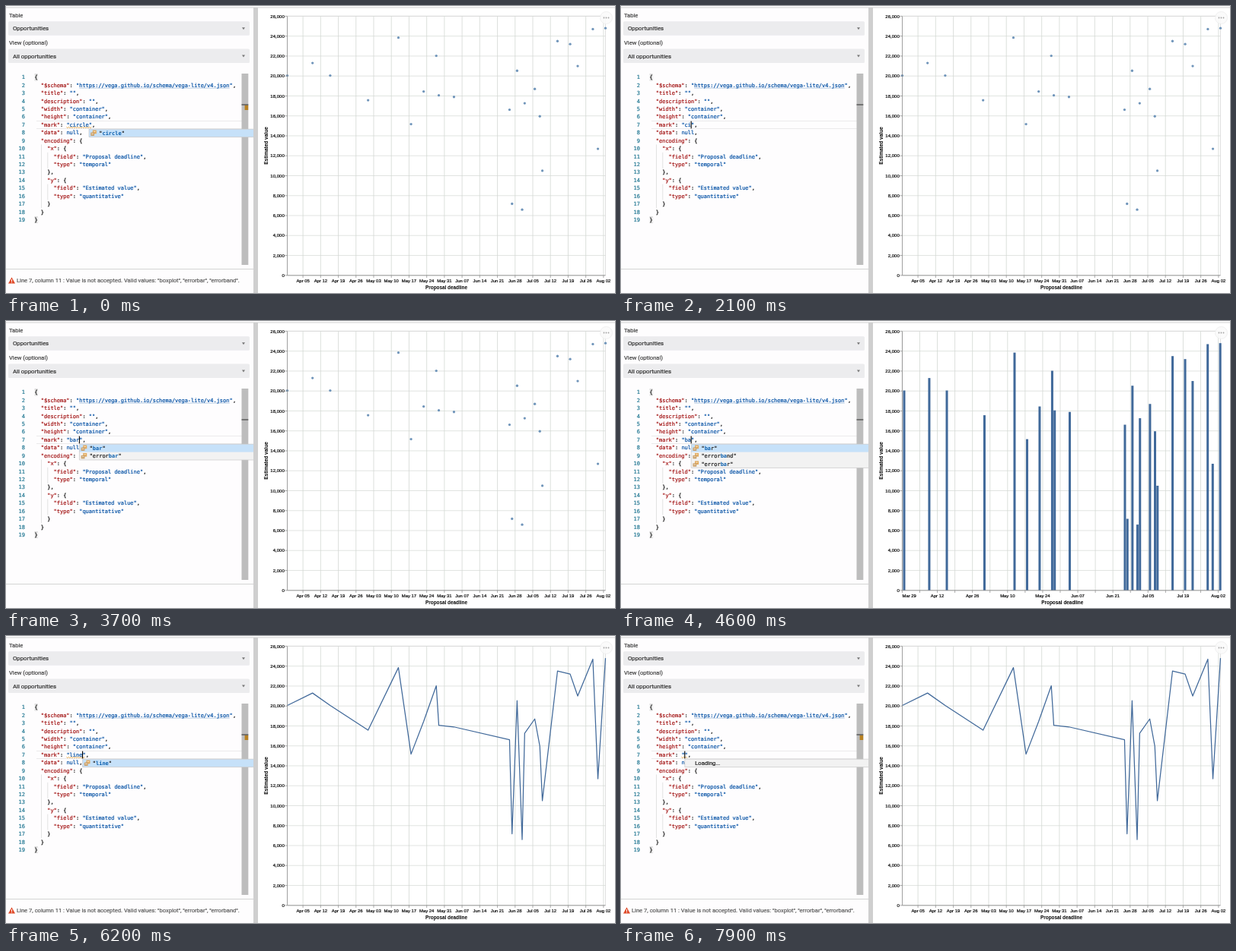
Write an HTML page with a canvas that moves like this. It is 800 px wide and 378 px high and loops after 8000 ms.

```html
<!DOCTYPE html>
<html lang="en">
<head>
<meta charset="utf-8">
<title>Chart editor</title>
<style>
html, body { margin: 0; width: 100%; height: 100%; overflow: hidden; background: #fff; }
canvas { display: block; width: 800px; height: 378px; }
</style>
</head>
<body>
<canvas id="stage"></canvas>
<script>
const W = 800, H = 378, LOOP = 8000;
const canvas = document.getElementById('stage');
const ctx = canvas.getContext('2d');
const ratio = Math.max(1, window.devicePixelRatio || 1);
canvas.width = W * ratio;
canvas.height = H * ratio;

const MONO = '"DejaVu Sans Mono", monospace';
const UI = 'Roboto, sans-serif';
const AXIS = '"Liberation Sans", Arial, sans-serif';

// ---- helpers
function rect(x, y, w, h, color) {
  ctx.fillStyle = color;
  ctx.fillRect(x, y, w, h);
}
function path(points, color, width = 1) {
  ctx.strokeStyle = color;
  ctx.lineWidth = width;
  ctx.beginPath();
  points.forEach(([x, y], i) => i ? ctx.lineTo(x, y) : ctx.moveTo(x, y));
  ctx.stroke();
}
// Regular text gets a hairline outline so that small sizes stay dark.
function text(str, x, y, size, family, color, align = 'left', weight = '') {
  ctx.font = `${weight} ${size}px ${family}`;
  ctx.fillStyle = ctx.strokeStyle = color;
  ctx.textAlign = align;
  ctx.textBaseline = 'alphabetic';
  ctx.fillText(str, x, y + size * 0.36);
  if (weight) return;
  ctx.lineWidth = 0.22;
  ctx.lineJoin = 'round';
  ctx.strokeText(str, x, y + size * 0.36);
}
function dot(x, y, r, color) {
  ctx.fillStyle = color;
  ctx.beginPath();
  ctx.arc(x, y, r, 0, Math.PI * 2);
  ctx.fill();
}

// ---- timeline: start, typed mark, popup kind, selected item
const STEPS = [
  [-600, 'circle', 'match'], [500, 'circle'],
  [1700, 'circl'], [1800, 'circ'], [1900, 'cir'], [2100, 'ci'], [2300, 'c'],
  [2500, ''], [2700, '', 'loading'], [2800, '', 'all', 'arc'],
  [3000, 'b', 'all', 'bar'], [3100, 'b', 'match'], [3200, 'ba', 'match'], [3400, 'bar', 'match'],
  [4600, 'ba', 'match'], [4800, 'b', 'match'], [5000, ''],
  [5200, '', 'loading'], [5400, '', 'all', 'arc'],
  [5700, 'l', 'all', 'line'], [5800, 'l', 'match'], [5900, 'li', 'match'],
  [6000, 'lin', 'match'], [6100, 'line', 'match'], [6400, 'line'],
  [6700, 'lin'], [6800, 'li'], [6900, 'l'], [7100, ''], [7700, '', 'loading']
];
const ERRORS = [[0, 600], [5500, 6400], [7500, LOOP]];
const BARS_AT = 4100, LINE_AT = 6200;

// ---- editor
const MARKS = ['arc', 'area', 'bar', 'boxplot', 'circle', 'errorband', 'errorbar', 'geoshape',
  'image', 'line', 'point', 'rect', 'rule', 'square', 'text', 'tick', 'trail'];
const SPEC = mark => `{
  "$schema": "https://vega.github.io/schema/vega-lite/v4.json",
  "title": "",
  "description": "",
  "width": "container",
  "height": "container",
  "mark": "${mark}",
  "data": null,
  "encoding": {
    "x": {
      "field": "Proposal deadline",
      "type": "temporal"
    },
    "y": {
      "field": "Estimated value",
      "type": "quantitative"
    }
  }
}`;
const SIZE = 6.98, CHAR = SIZE * 0.602, CODE_X = 37.4, ROW = 10.43, FIRST = 93.8;
const POP_TOP = 162.2, POP_ROW = 10.41, PANEL = 325;
const colX = col => CODE_X + col * CHAR;
const rowY = row => FIRST + row * ROW;

function codeLine(line, row) {
  const y = rowY(row);
  text(row + 1, 25, y, SIZE, MONO, '#237893', 'right');
  for (const m of line.matchAll(/"[^"]*"|null|[^\s"]+/g)) {
    const x = colX(m.index), token = m[0];
    const isKey = line[m.index + token.length] === ':';
    const color = isKey ? '#a31515' : /^("|null)/.test(token) ? '#0451a5' : '#111';
    text(token, x, y, SIZE, MONO, color);
    if (token.startsWith('"http'))
      rect(x + CHAR, y + 3.6, (token.length - 2) * CHAR, 0.5, 'rgba(4,81,165,0.55)');
  }
}

function guide(col, from, to) {
  rect(colX(col) + 0.3, rowY(from) - ROW / 2, 0.7, (to - from + 1) * ROW, '#d6d6d6');
}

function bracketBox(row) {
  rect(colX(0) + 0.2, rowY(row) - 4.6, 4, 9.2, '#cfcfcf');
  rect(colX(0) + 0.8, rowY(row) - 4, 2.8, 8, '#f3f3f3');
}

function squiggle(from, to, y) {
  const points = [];
  for (let x = from, i = 0; x <= to; x += 1.5, i++) points.push([x, y + (i % 2 ? 0.7 : -0.7)]);
  path(points, '#e5a23a', 0.9);
}

function icon(x, y) {
  rect(x + 2.6, y - 3.8, 5, 4.6, '#e0a85c');
  rect(x + 3.8, y - 2.4, 2.6, 0.8, '#fff3df');
  rect(x, y - 0.8, 4.8, 4.3, '#c9a06a');
  rect(x + 1.1, y + 0.6, 2.6, 0.8, '#fff3df');
}

function suggestions(typed, kind, selected) {
  if (kind === 'match') {
    const found = MARKS.filter(m => m.includes(typed));
    found.sort((a, b) => b.startsWith(typed) - a.startsWith(typed));
    return { items: found, selected: found[0] };
  }
  const start = MARKS.indexOf(selected) > 6 ? 5 : 0;
  return { items: MARKS.slice(start, start + 12), selected };
}

function popup(typed, kind, wanted, caretX) {
  const x = caretX + 0.2;
  const { items, selected } = kind === 'loading' ? { items: [''] } : suggestions(typed, kind, wanted);
  const h = items.length * POP_ROW;
  rect(x, POP_TOP, PANEL - x, h, '#f2f2f2');
  if (kind === 'loading') {
    text('Loading...', x + 13.4, POP_TOP + 5.3, 7.6, UI, '#222');
  } else {
    items.forEach((item, i) => {
      const y = POP_TOP + (i + 0.5) * POP_ROW;
      if (item === selected) rect(x, y - POP_ROW / 2, PANEL - x, POP_ROW, '#c6e1f9');
      icon(x + 2.2, y);
      const tx = x + 13.2;
      const at = kind === 'match' ? item.indexOf(typed) : -1;
      if (at < 0) {
        text(`"${item}"`, tx, y, SIZE, MONO, '#1c1c1c');
        return;
      }
      const end = at + typed.length;
      text('"' + item.slice(0, at), tx, y, SIZE, MONO, '#1c1c1c');
      text(typed, tx + (at + 1) * CHAR, y, SIZE, MONO, '#0a5fae', 'left', 'bold');
      text(item.slice(end) + '"', tx + (end + 1) * CHAR, y, SIZE, MONO, '#1c1c1c');
    });
  }
  path([[PANEL, POP_TOP], [x, POP_TOP], [x, POP_TOP + h], [PANEL, POP_TOP + h]], '#c8c8c8', 0.7);
}

function select(label, value, labelY, y) {
  text(label, 4, labelY, 7.6, UI, '#444');
  ctx.fillStyle = '#ececee';
  ctx.beginPath();
  ctx.roundRect(3, y, 317, 18.5, 1.5);
  ctx.fill();
  text(value, 9, y + 9.2, 7.8, UI, '#333');
  ctx.fillStyle = '#777';
  ctx.beginPath();
  ctx.moveTo(310, y + 8);
  ctx.lineTo(314, y + 8);
  ctx.lineTo(312, y + 11);
  ctx.fill();
}

function errorMessage() {
  ctx.fillStyle = '#e04b2a';
  ctx.beginPath();
  ctx.moveTo(7.5, 357.3);
  ctx.lineTo(12, 365.5);
  ctx.lineTo(3, 365.5);
  ctx.fill();
  rect(7, 360, 1, 2.8, '#fff');
  rect(7, 363.5, 1, 1, '#fff');
  text('Line 7, column 11 : Value is not accepted. Valid values: "boxplot", "errorbar", "errorband".',
    14, 361.5, 7.58, UI, '#5c5c5c');
}

function editor(t) {
  rect(0, 0, PANEL, H, '#fefdfe');
  select('Table', 'Opportunities', 12.3, 20.3);
  select('View (optional)', 'All opportunities', 48.3, 56.5);

  const [start, typed, kind, wanted] = STEPS.findLast(s => s[0] <= t);
  const failed = ERRORS.some(([a, b]) => t >= a && t < b);
  const caretX = colX(11 + typed.length);

  rect(40, 151, 270, 0.8, '#e6e6e6');
  rect(40, 161.2, 270, 0.8, '#e6e6e6');
  guide(2, 9, 16);
  guide(4, 10, 11);
  guide(4, 14, 15);
  bracketBox(0);
  bracketBox(18);
  SPEC(typed).split('\n').forEach(codeLine);
  if (failed) squiggle(colX(10), colX(12 + typed.length), 160);

  rect(309.5, 89, 8.8, 252, '#bdbdbd');
  if (failed) rect(313.6, 130.5, 4.6, 6.5, '#b98223');
  rect(309.5, 129.3, 8.8, 1.4, '#555');
  rect(0, 346, PANEL, 1, '#d4d4d4');
  if (failed) errorMessage();

  if ((t - start) % 1000 < 500) rect(caretX - 0.4, 151.6, 1.1, 9.8, '#000');
  if (kind) popup(typed, kind, wanted, caretX);
  rect(PANEL, 2, 6, H - 2, '#cfcfcf');
}

// ---- chart: days after the first deadline, value in thousands
const DATA = [[0, 20.05], [10, 21.3], [17, 20.05], [32, 17.57], [44, 23.85], [49, 15.17],
  [54, 18.45], [59, 22.03], [60, 18.06], [66, 17.9], [88, 16.62], [89, 7.18], [91, 20.53],
  [93, 6.6], [94, 17.27], [98, 18.7], [100, 15.96], [101, 10.5], [107, 23.5], [112, 23.2],
  [115, 21], [121, 24.7], [123, 12.7], [126, 24.8]];
const LEFT = 369.5, RIGHT = 787.5, TOP = 13.4, BASE = 354.8;
const valueY = v => BASE - v * (BASE - TOP) / 26;
const dayLabel = day => {
  const d = new Date(Date.UTC(2020, 2, 30 + day));
  const month = ['Mar', 'Apr', 'May', 'Jun', 'Jul', 'Aug'][d.getUTCMonth() - 2];
  return `${month} ${String(d.getUTCDate()).padStart(2, '0')}`;
};

function chart(t) {
  const bars = t >= BARS_AT && t < LINE_AT;
  const x0 = bars ? 372 : LEFT, scale = bars ? 3.295 : (RIGHT - LEFT) / 126;
  const dayX = day => x0 + day * scale;

  rect(331, 0, W - 331, H, '#fff');
  for (let v = 0; v <= 26; v += 2) {
    const y = valueY(v);
    path([[LEFT, y], [RIGHT, y]], '#dadeda', 0.8);
    path([[LEFT - 3.3, y], [LEFT, y]], '#888', 0.7);
    text(v ? v + ',000' : '0', 365.8, y, 6.05, AXIS, '#111', 'right');
  }
  for (let day = bars ? -1 : 6, i = 0; day <= 126; day += 7, i++) {
    const x = dayX(day) + 0.7;
    path([[x, TOP], [x, BASE]], '#d4d9d4', 0.8);
    path([[x, BASE], [x, BASE + 3.2]], '#888', 0.7);
    if (bars && i % 2) continue;
    const flush = day < 0;
    text(dayLabel(day), flush ? LEFT : x, 361.8, 5.9, AXIS, '#111', flush ? 'left' : 'center');
  }
  path([[LEFT, TOP], [RIGHT, TOP], [RIGHT, BASE]], '#d8d8d8', 0.8);

  const points = DATA.map(([day, v]) => [dayX(day), valueY(v)]);
  if (bars) {
    for (const [x, y] of points) rect(x - 1.5, y, 3, BASE - y, '#40699a');
  } else if (t >= LINE_AT) {
    path(points, '#41699a', 1.25);
  } else {
    for (const [x, y] of points) dot(x, y, 1.65, '#7095ba');
  }
  path([[LEFT, TOP], [LEFT, BASE], [RIGHT, BASE]], '#888', 0.8);

  text('Proposal deadline', bars ? 579.8 : 578.5, 370.2, 6.4, AXIS, '#000', 'center', 'bold');
  ctx.save();
  ctx.translate(341.5, 184);
  ctx.rotate(-Math.PI / 2);
  text('Estimated value', 0, 0, 6.5, AXIS, '#000', 'center', 'bold');
  ctx.restore();

  dot(788.5, 15.5, 8, 'rgba(250,250,250,0.85)');
  ctx.strokeStyle = '#ececec';
  ctx.lineWidth = 0.8;
  ctx.stroke();
  for (const dx of [-3, 0, 3]) dot(788.5 + dx, 15.5, 0.9, '#a4a4a4');
}

function draw(now) {
  const t = now % LOOP;
  ctx.setTransform(ratio, 0, 0, ratio, 0, 0);
  rect(0, 0, W, H, '#fff');
  chart(t);
  editor(t);
  rect(0, 1.5, W, 1, '#d0d0d0');
}

const began = performance.now();
function tick() {
  draw(performance.now() - began);
  requestAnimationFrame(tick);
}
tick();
</script>
</body>
</html>
```
